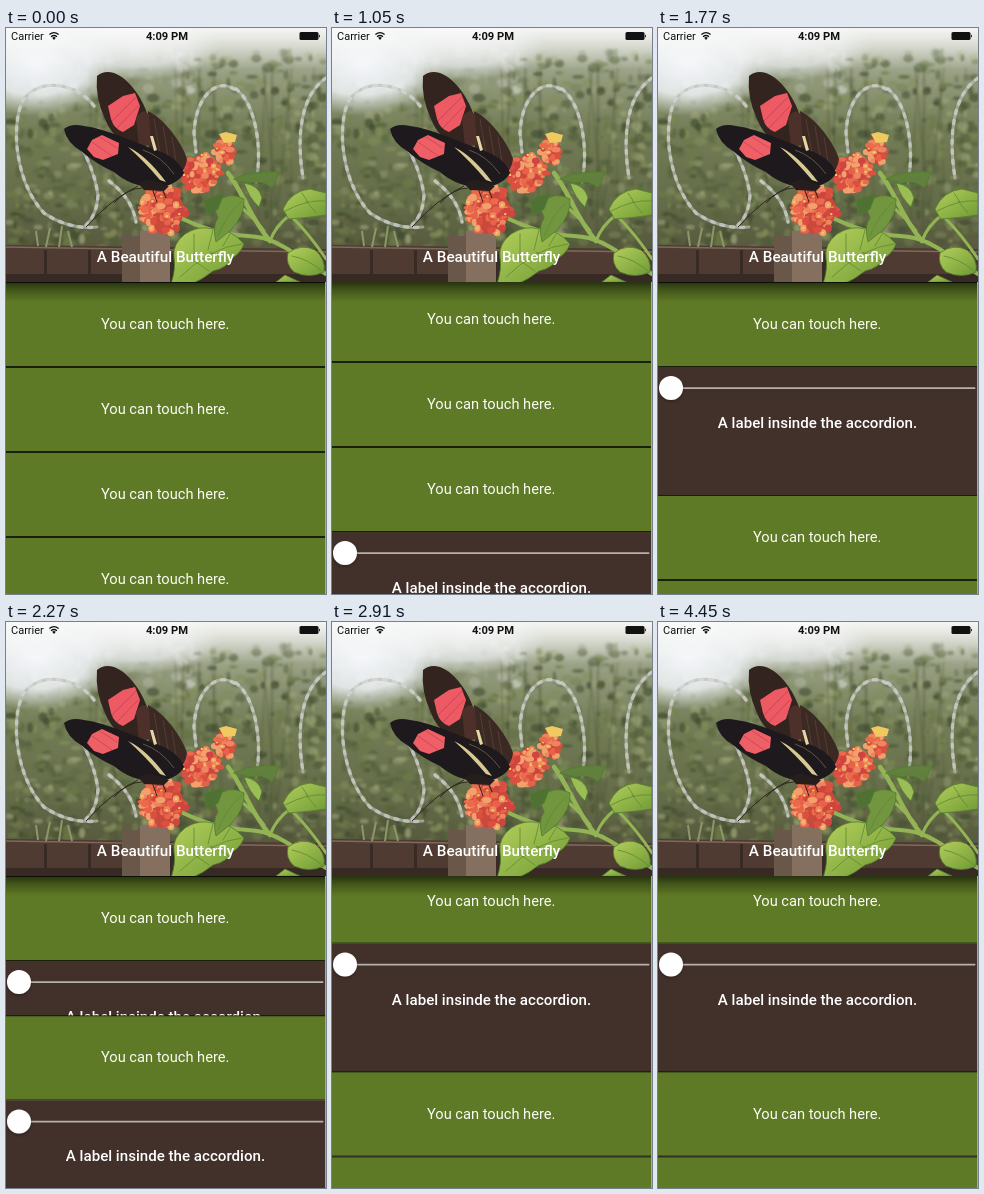
These frames come from a looping animation (320x566 px, 4490 ms). An HTML page:

```html
<!DOCTYPE html>
<html lang="en">
<head>
<meta charset="utf-8">
<title>Accordion list</title>
<style>
html, body { margin: 0; width: 100%; height: 100%; overflow: hidden; background: #a5ae88; }
svg { position: absolute; left: 0; top: 0; width: 100vw; height: 100vh; display: block; }
#header { will-change: transform; }
text { font-family: Roboto, Inter, sans-serif; }
.mid { text-anchor: middle; }
.touch { font-size: 14.65px; fill: #fbfcf6; }
.label { font-size: 15.1px; font-weight: 500; fill: #fff; }
</style>
</head>
<body>
<svg id="list" viewBox="0 0 320 566">
  <defs>
    <filter id="knobShade" x="-50%" y="-50%" width="200%" height="200%">
      <feDropShadow dx="0" dy="1.5" stdDeviation="1.5" flood-opacity=".3"/>
    </filter>
  </defs>
</svg>
<svg id="header" viewBox="0 0 320 566">
  <defs>
    <linearGradient id="backdrop" x1="0" y1="0" x2="0" y2="1">
      <stop offset="0" stop-color="#c6cabd"/>
      <stop offset=".2" stop-color="#939b7d"/>
      <stop offset=".4" stop-color="#737d56"/>
      <stop offset=".7" stop-color="#636b48"/>
      <stop offset="1" stop-color="#4e4b36"/>
    </linearGradient>
    <linearGradient id="veil" x1="0" y1="0" x2="0" y2="1">
      <stop offset="0" stop-color="#fff" stop-opacity=".82"/>
      <stop offset=".4" stop-color="#fff" stop-opacity=".5"/>
      <stop offset="1" stop-color="#fff" stop-opacity="0"/>
    </linearGradient>
    <radialGradient id="sky">
      <stop offset="0" stop-color="#f4f6fa"/>
      <stop offset=".6" stop-color="#eceff2" stop-opacity=".88"/>
      <stop offset="1" stop-color="#dfe4e2" stop-opacity="0"/>
    </radialGradient>
    <linearGradient id="shade" x1="0" y1="0" x2="0" y2="1">
      <stop offset="0" stop-color="#000" stop-opacity=".58"/>
      <stop offset=".4" stop-color="#000" stop-opacity=".3"/>
      <stop offset="1" stop-color="#000" stop-opacity="0"/>
    </linearGradient>
    <linearGradient id="leaf" x1="0" y1="0" x2="1" y2="1">
      <stop offset="0" stop-color="#b4cf5c"/>
      <stop offset="1" stop-color="#6f9a35"/>
    </linearGradient>
    <filter id="soft" x="-10%" y="-10%" width="120%" height="120%"><feGaussianBlur stdDeviation="1.1"/></filter>
    <filter id="fine"><feGaussianBlur stdDeviation=".7"/></filter>
    <clipPath id="frame"><rect width="320" height="254"/></clipPath>
  </defs>
  <rect y="254" width="319" height="20" fill="url(#shade)"/>
  <g clip-path="url(#frame)">
    <rect width="320" height="254" fill="url(#backdrop)"/>
    <g id="trees" filter="url(#soft)"></g>
    <ellipse cx="30" cy="36" rx="88" ry="52" fill="url(#sky)"/>
    <ellipse cx="130" cy="18" rx="85" ry="34" fill="url(#sky)" opacity=".7"/>
    <g filter="url(#fine)">
      <path d="M0 217L320 221V254H0Z" fill="#4f3b31"/>
      <path d="M0 219L118 221M164 222L320 224" stroke="#7d6a5c" stroke-width="1.5"/>
      <path d="M134 203H164V254H134Z" fill="#85705f"/>
      <path d="M116 208H134V254H116Z" fill="#69574a"/>
      <path d="M164 226H180V254H164ZM38 222H41V254H38ZM82 222H85V254H82Z" fill="#382a25"/>
      <path d="M0 246H116V254H0ZM180 246H320V254H180Z" fill="#372a24"/>
      <path d="M32 218L30 203M40 219L44 200M53 219L56 198M66 219L62 203" stroke="#8b9768" stroke-width="2"/>
    </g>
    <g id="wire" fill="none" stroke-linecap="round" filter="url(#fine)"></g>
    <g stroke-linecap="round" stroke-linejoin="round">
      <g fill="none" stroke="#93b455" stroke-width="4">
        <path d="M171 188C198 202 222 207 242 208S270 212 320 246"/>
        <path d="M222 145C237 164 244 190 264 213" stroke-width="4.5"/>
        <path d="M264 213Q270 197 284 187M287 190Q304 207 320 231M236 180Q250 192 258 203" stroke-width="3"/>
      </g>
      <g fill="url(#leaf)" stroke="#527b2d" stroke-width=".8">
        <path d="M168 230Q166 216 179 206Q193 197 207 201Q226 201 238 216Q234 226 226 230Q221 240 207 243Q196 252 185 256H165Q170 241 168 230Z"/>
        <path d="M277 181Q285 163 304 161L320 165V187Q300 190 283 191Z"/>
        <path d="M228 151Q242 142 273 144Q270 155 266 160Q258 152 244 155Z" fill="#61803f"/>
        <path d="M207 176Q223 162 238 171Q239 187 225 202L210 214Q206 198 212 190Z" fill="#71963f"/>
        <path d="M238 155Q253 157 256 170L253 179Q243 170 238 155Z" fill="#9abd55"/>
        <path d="M282 225Q295 215 309 222Q320 231 318 244Q303 251 288 244Q279 236 282 225Z"/>
        <path d="M198 172L218 165L212 181L202 187Z" fill="#4f7133"/>
        <path d="M270 254L279 247L294 254Z"/>
      </g>
      <path d="M236 216Q205 219 174 249M207 202L202 222M224 206L217 218M188 206L188 234M190 234L203 243M204 224L222 233M279 183Q302 171 320 173M296 165L302 174M300 173L310 185M212 208Q220 187 235 174M286 228Q302 231 316 243M232 151Q255 146 270 147" fill="none" stroke="#5f8a30" stroke-width=".8"/>
    </g>
    <g id="flowers"></g>
    <g stroke-linejoin="round">
      <path d="M142 83C154 88 174 110 181 131Q180 142 170 150L157 154L143 123Z" fill="#3b2924"/>
      <path d="M148 91L158 148M157 98L165 145M166 109L171 139" stroke="#5d4236" stroke-width=".8" fill="none"/>
      <path d="M91 48Q98 42 108 45C123 50 139 73 143 92Q145 108 139 118L124 116Q107 111 99 91Q89 70 91 48Z" fill="#33241f"/>
      <path d="M102 78L117 68L129 65L134 78L128 97L117 104Q108 101 105 91Z" fill="#ee5a64"/>
      <path d="M106 93L130 69M111 100L132 78" stroke="#b7384c" stroke-width=".6"/>
      <path d="M130 90Q137 78 143 87L145 117L133 119Z" fill="#4d302a"/>
      <path d="M58 101Q65 95 78 98C101 101 130 115 145 120Q173 129 178 145Q171 158 148 160Q124 158 108 144Q90 136 75 123Q61 115 58 101Z" fill="#1d191c"/>
      <path d="M81 121L86 112L96 107L113 115L112 126L97 132L88 129Z" fill="#ef5f66"/>
      <path d="M86 114L106 128M94 109L111 120" stroke="#b63d4d" stroke-width=".6"/>
      <path d="M122 119Q141 128 160 154L154 152Q138 133 122 119Z" fill="#d7c994"/>
      <path d="M144 108L147 108L151 122L148 123Z" fill="#e4d7a6"/>
      <path d="M137 122Q155 128 168 146" fill="none" stroke="#665446" stroke-width="1"/>
      <path d="M132 158Q105 171 80 199M136 160Q122 160 108 175" fill="none" stroke="#302823" stroke-width="1"/>
      <path d="M132 155L143 151L163 158L158 163L138 162Z" fill="#251e1d"/>
      <path d="M146 160L151 174M156 160L160 170" stroke="#2b211c" stroke-width="1"/>
    </g>
    <rect width="320" height="42" fill="url(#veil)"/>
  </g>
  <text class="mid label" x="159.5" y="234" style="font-size:15.25px">A Beautiful Butterfly</text>
  <g fill="#111">
    <text x="5" y="12" font-size="11">Carrier</text>
    <text class="mid" x="161" y="12" font-size="11.2" font-weight="700">4:09 PM</text>
    <path d="M46.2 9.8L48 12L49.8 9.8Q48 8.4 46.2 9.8Z"/>
    <path d="M43.4 6.6Q48 2.8 52.6 6.6M45 8.7Q48 6.3 51 8.7" fill="none" stroke="#111" stroke-width="1.3"/>
    <rect x="293.5" y="4" width="19" height="8" rx="1.6"/>
    <path d="M313 6.4Q315 8 313 9.6Z"/>
  </g>
</svg>
<script>
const LOOP = 4490, TOP = 254, ROW = 85, PANEL = 128, WIDTH = 319, COUNT = 7;
const byId = id => document.getElementById(id);
const add = (parent, html) => {
  const g = document.createElementNS('http://www.w3.org/2000/svg', 'g');
  g.innerHTML = html;
  return parent.appendChild(g);
};

let seed = 11;
const rnd = (a, b) => {
  seed = (seed * 16807) % 2147483647;
  return a + (b - a) * seed / 2147483647;
};
const pick = list => list[Math.floor(rnd(0, list.length))];

function paintTrees() {
  const far = ['#a7ae96', '#858f70', '#c9cec0', '#6d7757'];
  const near = ['#3f4b2f', '#54633b', '#828e58', '#6d7a48', '#4a5535', '#9aa275'];
  let out = '';
  for (let i = 0; i < 800; i++) {
    const x = rnd(0, 320), y = rnd(22, 220);
    const color = pick(y < 62 && x < 190 ? far : near);
    out += `<ellipse cx="${x}" cy="${y}" rx="${rnd(1.5, 6.5)}" ry="${rnd(1.5, 5)}" fill="${color}" opacity="${rnd(.3, .8)}"/>`;
  }
  for (let i = 0; i < 14; i++) {
    const x = rnd(65, 320);
    out += `<path d="M${x} 40L${x + rnd(-18, 18)} 205" stroke="#45432f" stroke-width="${rnd(.8, 2)}" opacity=".35"/>`;
  }
  add(byId('trees'), out);
}

function paintWire() {
  const coils = [
    'M88 78C72 56 35 48 17 72C4 99 10 155 38 185Q63 202 91 199',
    'M71 112Q88 139 92 167Q91 187 80 197',
    'M228 61C211 50 190 67 188 105L190 124',
    'M230 61C249 75 257 119 250 154',
    'M320 50C295 67 290 107 297 150',
    'M103 153Q126 170 130 194'
  ];
  add(byId('wire'), coils.map(d =>
    `<path d="${d}" stroke="#b9bbb4" stroke-width="3" opacity=".7"/>` +
    `<path d="${d}" stroke="#e2e4e2" stroke-width="3.6" stroke-dasharray="3 7" opacity=".5"/>`).join(''));
}

function paintFlowers() {
  const colors = ['#d9503f', '#e96b4b', '#ef8560', '#cf4440', '#e8614a', '#f2a06c'];
  const clusters = [[157, 182, 23, 25, 110], [195, 145, 19, 19, 80], [218, 124, 9, 13, 26]];
  let out = '';
  for (const [cx, cy, rx, ry, n] of clusters) {
    out += `<ellipse cx="${cx}" cy="${cy}" rx="${rx * .9}" ry="${ry * .9}" fill="#c9493a"/>`;
    for (let i = 0; i < n; i++) {
      const a = rnd(0, 6.283), r = Math.sqrt(rnd(0, 1));
      const x = cx + Math.cos(a) * r * rx, y = cy + Math.sin(a) * r * ry;
      out += `<ellipse cx="${x}" cy="${y}" rx="${rnd(2.2, 5)}" ry="${rnd(2, 4)}" fill="${pick(colors)}"/>`;
      if (i % 6 === 0) out += `<circle cx="${x}" cy="${y}" r="1.2" fill="#f6cb59"/>`;
    }
  }
  out += '<path d="M213 106L220 104L231 107L229 114L218 115Z" fill="#f1c961"/>';
  add(byId('flowers'), out);
}

const rowHtml = `<rect width="${WIDTH}" height="${ROW}" fill="#080a03"/>
  <rect y=".8" width="${WIDTH}" height="${ROW - 1.6}" fill="#5f7a26"/>
  <text class="mid touch" x="159.2" y="47">You can touch here.</text>`;
const panelHtml = `<rect width="${WIDTH}" height="${PANEL + .5}" fill="#42302a"/>
  <rect x="2" y="20.2" width="315.5" height="1.8" rx=".9" fill="#b8b1ae"/>
  <circle cx="13" cy="21" r="12" fill="#fff" filter="url(#knobShade)"/>
  <text class="mid label" x="159.5" y="61">A label insinde the accordion.</text>`;

// Later cells lie on top, so a closing panel slides under the next row.
const cells = Array.from({ length: COUNT }, () => ({
  row: add(byId('list'), rowHtml),
  panel: add(byId('list'), panelHtml)
}));

const ease = (t, from, span) => {
  const x = Math.min(1, Math.max(0, (t - from) / span));
  return x * x * (3 - 2 * x);
};

function draw(t) {
  const scroll = 5 * (ease(t, 560, 300) - ease(t, 1270, 280)) + 17.5 * ease(t, 2560, 280);
  const open = [
    ease(t, 1310, 280) - ease(t, 2117, 280) + ease(t, 2530, 280),
    ease(t, 2050, 280) - ease(t, 2530, 280),
    ease(t, 520, 280) - ease(t, 1310, 280)
  ];
  let y = TOP - scroll;
  cells.forEach(({ row, panel }, i) => {
    const part = open[i] || 0;
    row.setAttribute('transform', `translate(0 ${y})`);
    y += ROW;
    panel.setAttribute('transform', `translate(0 ${y})`);
    panel.setAttribute('visibility', part > .001 ? 'visible' : 'hidden');
    y += PANEL * part;
  });
}

paintTrees();
paintWire();
paintFlowers();

const start = performance.now();
function tick() {
  draw((performance.now() - start) % LOOP);
  requestAnimationFrame(tick);
}
tick();
</script>
</body>
</html>
```
